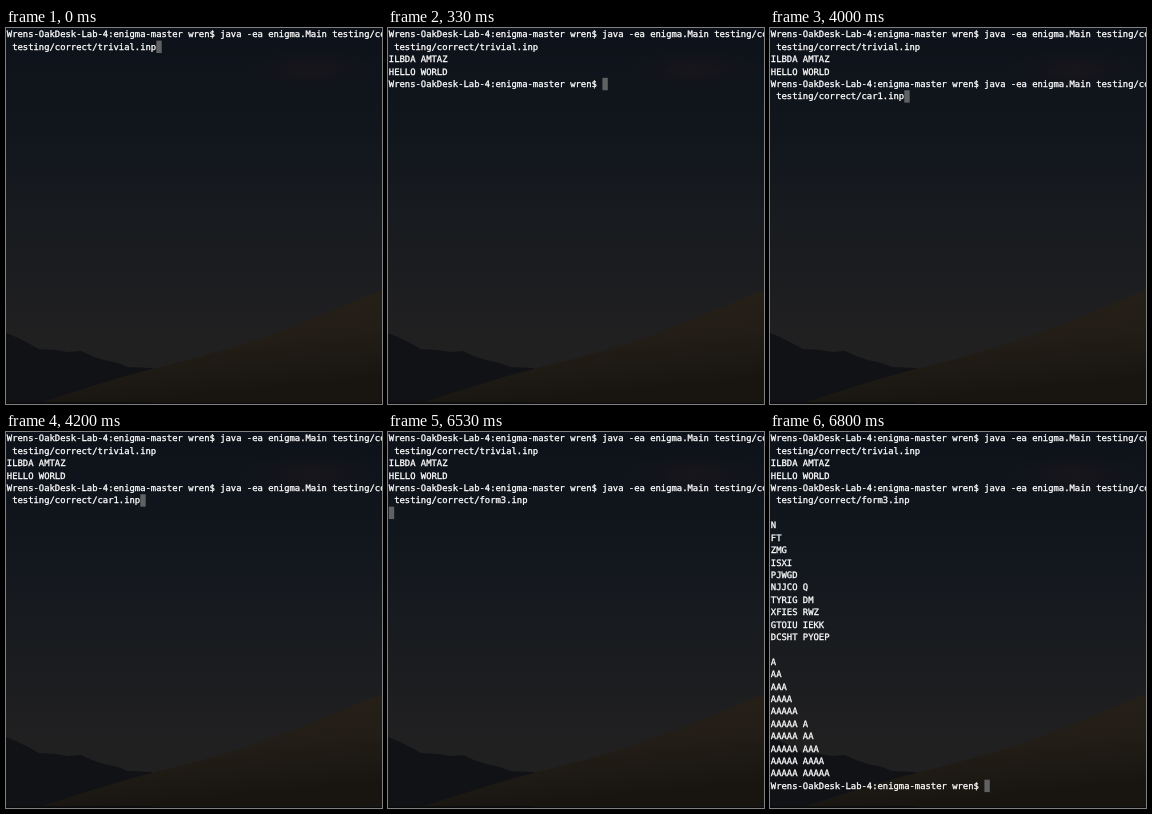
Animation of 376 by 376 pixels, one loop 8000 ms. Source, as an HTML page:

```html
<!DOCTYPE html>
<html lang="en">
<head>
<meta charset="utf-8">
<title>Terminal session</title>
<style>
  html, body { margin: 0; width: 100%; height: 100%; overflow: hidden; background: #000; }
  svg { display: block; width: 100vw; height: 100vh; }
  text {
    font: 8.87px "DejaVu Sans Mono", monospace;
    fill: #fff;
    stroke: #fff;
    stroke-width: .3px;
    white-space: pre;
    text-rendering: geometricPrecision;
  }
</style>
</head>
<body>
<svg viewBox="0 0 376 376">
  <defs>
    <linearGradient id="sky" x2="0" y2="1">
      <stop offset="0" stop-color="#0d1119"/>
      <stop offset=".3" stop-color="#12171e"/>
      <stop offset=".6" stop-color="#1a1c1f"/>
      <stop offset=".85" stop-color="#212021"/>
    </linearGradient>
    <linearGradient id="dune" x1="0" y1="0" x2=".3" y2="1">
      <stop offset="0" stop-color="#272119"/>
      <stop offset=".6" stop-color="#221d16"/>
      <stop offset="1" stop-color="#181511"/>
    </linearGradient>
    <radialGradient id="cloud">
      <stop offset="0" stop-color="#18161b"/>
      <stop offset="1" stop-color="#18161b" stop-opacity="0"/>
    </radialGradient>
  </defs>
  <rect width="376" height="376" fill="url(#sky)"/>
  <ellipse cx="305" cy="42" rx="70" ry="20" fill="url(#cloud)"/>
  <path fill="#111215" d="M0 305 L10 309 20 314 33 321 50 322 62 324 75 323 86 328 98 332 112 335 122 339 146 340 V376 H0Z"/>
  <path fill="url(#dune)" d="M376 262 C330 280 285 301 240 315 S165 336 138 343 S80 360 36 374 H376Z"/>
  <rect y="374.5" width="376" height="1.5" fill="#0a0a0b"/>
  <rect id="cursor" width="5.4" height="12.4" fill="#606163"/>
  <g id="screen"></g>
</svg>
<script>
const LOOP = 8000, LEFT = 0.8, ADVANCE = 5.34, LINE = 12.41, BASELINE = 9.4;
const cursor = document.getElementById("cursor");
const screen = document.getElementById("screen");

const prompt = "Wrens-OakDesk-Lab-4:enigma-master wren$ ";
const command = file => [
  prompt + "java -ea enigma.Main testing/correct",
  ` testing/correct/${file}.inp`
];
const groups = n => "A".repeat(n).replace(/^(.{5})(.)/, "$1 $2");

const first = command("trivial");
const decoded = [...first, "ILBDA AMTAZ", "HELLO WORLD"];
const second = file => [...decoded, ...command(file)];
const output = [
  ...second("form3"), "",
  "N", "FT", "ZMG", "ISXI", "PJWGD", "NJJCO Q", "TYRIG DM", "XFIES RWZ", "GTOIU IEKK", "DCSHT PYOEP", "",
  ...Array.from({ length: 10 }, (_, i) => groups(i + 1))
];

// Each state holds from its start time; the cursor follows the last line.
const states = [
  [0, first],
  [70, [...first, ""]],
  [330, [...decoded, prompt]],
  [1800, second("trivial")],
  [4000, second("car1")],
  [4870, second("form3")],
  [6530, [...second("form3"), ""]],
  [6730, [...output, ""]],
  [6800, [...output, prompt]]
];

function show(lines) {
  screen.replaceChildren(...lines.map((line, row) => {
    const text = document.createElementNS("http://www.w3.org/2000/svg", "text");
    text.setAttribute("x", LEFT);
    text.setAttribute("y", BASELINE + row * LINE);
    text.textContent = line;
    return text;
  }));
  cursor.setAttribute("x", LEFT + lines.at(-1).length * ADVANCE);
  cursor.setAttribute("y", 0.2 + (lines.length - 1) * LINE);
}

let shown;
const start = performance.now();
function tick() {
  const time = (performance.now() - start) % LOOP;
  const lines = states.findLast(([from]) => from <= time)[1];
  if (lines !== shown) show(shown = lines);
  requestAnimationFrame(tick);
}
tick();
</script>
</body>
</html>
```
